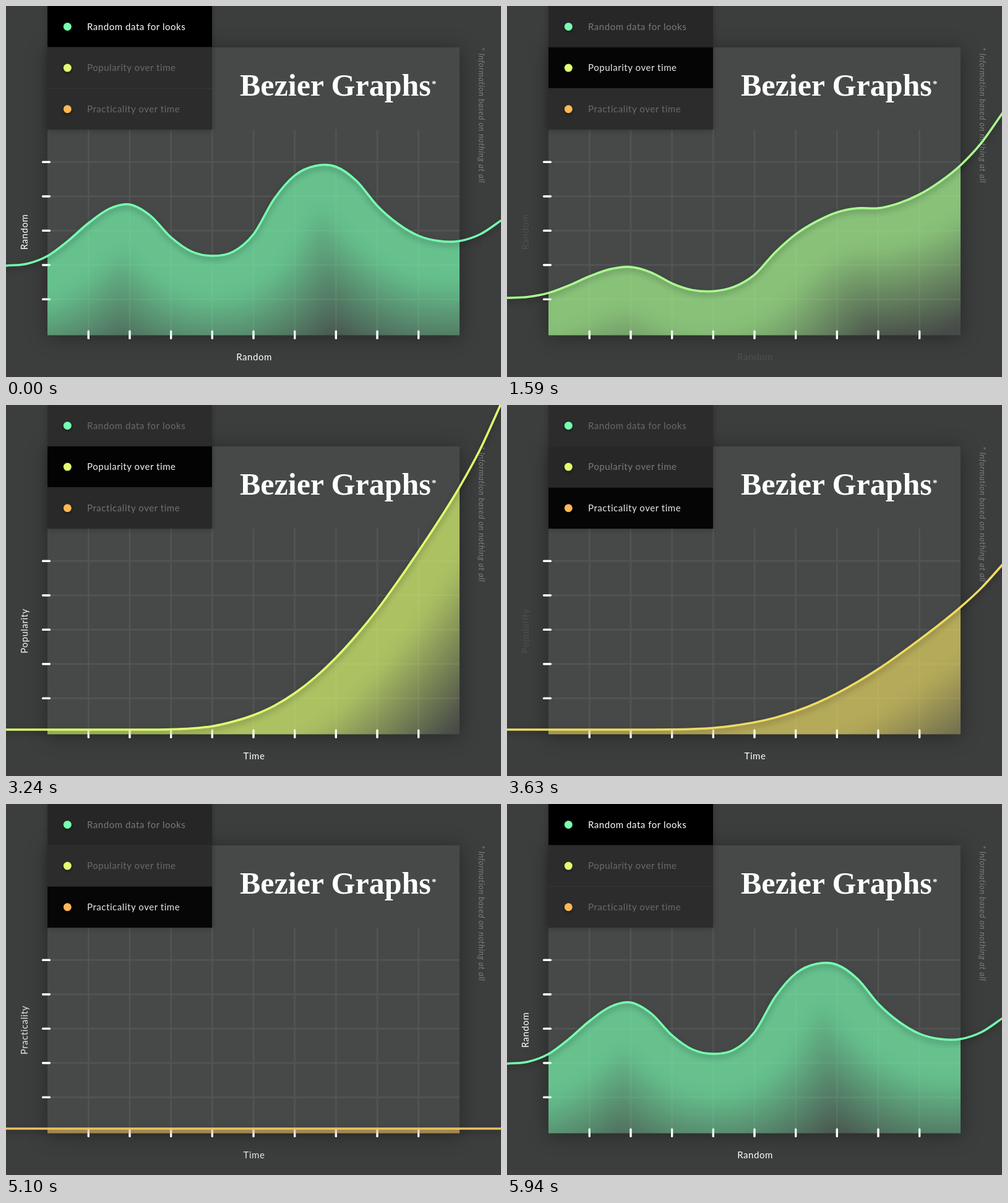
Animation, 800 px wide and 600 px high, one loop 5.97 s. Source, as an HTML page with a canvas:

```html
<!DOCTYPE html>
<html lang="en">
<head>
<meta charset="utf-8">
<title>Bezier Graphs</title>
<style>
  html, body { margin: 0; width: 100%; height: 100%; overflow: hidden; background: #3c3e3d; }
  svg, canvas { position: absolute; left: 0; top: 0; width: 800px; height: 600px; }
  text { font: 15px Lato, sans-serif; letter-spacing: .55px; fill: #fff; }
  .card { fill: #464948; filter: drop-shadow(0 3px 16px rgba(0, 0, 0, .35)); }
  .grid { stroke: #fff; stroke-opacity: .065; stroke-width: 2.5; }
  .menu { filter: drop-shadow(0 1px 5px rgba(0, 0, 0, .25)); }
  .dot { filter: drop-shadow(0 2px 2px rgba(0, 0, 0, .45)); }
  .title { font: bold 50px "Liberation Serif", serif; letter-spacing: 0; }
  .star { font: bold 15px "Liberation Serif", serif; }
  .note { font: italic 13px Lato, sans-serif; letter-spacing: .6px; fill: #7c7d7d; }
  .axis { text-anchor: middle; }
</style>
</head>
<body>
<svg viewBox="0 0 800 600">
  <rect class="card" x="67" y="67" width="666" height="465.5"/>
  <path class="grid" id="grid"/>
  <g class="menu" id="menu"></g>
  <text class="title" x="378" y="145">Bezier Graphs</text>
  <text class="star" x="688" y="130.5">*</text>
  <text class="note" transform="translate(764 67) rotate(90)">* Information based on nothing at all</text>
  <text class="axis" id="xLabel" x="401" y="573"></text>
  <text class="axis" id="yLabel" transform="translate(35 365.5) rotate(-90)"></text>
</svg>
<canvas id="plot" width="800" height="600"></canvas>
<script>
const LOOP = 5970, STARTS = [1170, 3210, 5040];
const MORPH = 844, MENU_FADE = 480, LABEL_OUT = 460, LABEL_IN = 440;
const STEP = 100 / 3, BOTTOM = 532.5, FLAT = 525;
const LEFT = 67, RIGHT = 733, GLOW = 0.66;

// Curve heights, sampled every STEP pixels across the stage
const views = [
  { name: 'Random data for looks', x: 'Random', y: 'Random', color: [118, 255, 177],
    pts: [420, 417, 404.5, 380, 351, 328, 321, 339, 374, 397, 404, 397.5, 369,
          312, 274, 258.5, 260, 283, 323, 352, 371.5, 380, 380, 369, 347] },
  { name: 'Popularity over time', x: 'Time', y: 'Popularity', color: [224, 255, 112],
    pts: [...Array(8).fill(FLAT), 524.5, 523, 519.5, 512, 501.5, 486.5, 466, 440, 408.5,
          372, 331, 285, 236.5, 186, 132, 71, -2] },
  { name: 'Practicality over time', x: 'Time', y: 'Practicality', color: [255, 184, 84],
    pts: Array(25).fill(FLAT) }
];

const $ = id => document.getElementById(id);
const clamp = v => Math.max(0, Math.min(1, v));
const mix = (a, b, k) => a + (b - a) * k;
const quartInOut = t => t < 0.5 ? 8 * t ** 4 : 1 - 8 * (1 - t) ** 4;

function svg(tag, attrs, parent) {
  const el = document.createElementNS('http://www.w3.org/2000/svg', tag);
  for (const key in attrs) el.setAttribute(key, attrs[key]);
  return parent.appendChild(el);
}

const cols = Array.from({ length: 9 }, (_, i) => 133.3 + i * 66.67);
const rows = Array.from({ length: 5 }, (_, i) => 252.3 + i * 55.5);
$('grid').setAttribute('d',
  cols.map(x => `M${x} 200V${BOTTOM}`).join('') + rows.map(y => `M${LEFT} ${y}H${RIGHT}`).join(''));

const items = views.map((view, i) => {
  const top = i * 66.67, mid = top + 33.4;
  const back = svg('rect', { x: LEFT, y: top, width: 266, height: 66.67 }, $('menu'));
  svg('circle', { class: 'dot', cx: 99.3, cy: mid, r: 6.5, fill: `rgb(${view.color})` }, $('menu'));
  const text = svg('text', { x: 131, y: mid + 5.2 }, $('menu'));
  text.textContent = view.name;
  return { back, text };
});
for (const y of [66.9, 133.5])
  svg('path', { d: `M${LEFT} ${y}h266`, stroke: '#fff', 'stroke-opacity': 0.03 }, $('menu'));

const ctx = $('plot').getContext('2d');
const glow = document.createElement('canvas');
glow.width = 800;
glow.height = 600;
const gtx = glow.getContext('2d');

const ticks = new Path2D();
for (const x of cols) { ticks.moveTo(x, 526); ticks.lineTo(x, 537.5); }
for (const y of rows) { ticks.moveTo(59.5, y); ticks.lineTo(70.5, y); }

function drawTicks(alpha) {
  ctx.strokeStyle = `rgba(255,255,255,${alpha})`;
  ctx.lineWidth = 3.2;
  ctx.lineCap = 'round';
  ctx.stroke(ticks);
}

// Smooth spline through the samples, with straight run-outs past both edges
function curvePath(pts) {
  const n = pts.length - 1;
  const at = i => i < 0 ? 2 * pts[0] - pts[1] : i > n ? 2 * pts[n] - pts[n - 1] : pts[i];
  const path = new Path2D();
  path.moveTo(-STEP, at(-1));
  path.lineTo(0, at(0));
  for (let i = 0; i < n; i++) {
    const x = i * STEP;
    path.bezierCurveTo(
      x + STEP / 3, at(i) + (at(i + 1) - at(i - 1)) / 6,
      x + STEP * 2 / 3, at(i + 1) - (at(i + 2) - at(i)) / 6,
      x + STEP, at(i + 1));
  }
  path.lineTo(800 + STEP, at(n + 1));
  return path;
}

// Light that fades with distance from the curve
function paintGlow(curve, color) {
  const layers = 28;
  gtx.globalCompositeOperation = 'source-over';
  gtx.clearRect(0, 0, 800, 600);
  gtx.globalCompositeOperation = 'lighter';
  gtx.strokeStyle = `rgba(255,255,255,${GLOW / layers})`;
  gtx.lineJoin = gtx.lineCap = 'round';
  for (let i = 0; i < layers; i++) {
    gtx.lineWidth = 2 * mix(65, 220, i / (layers - 1));
    gtx.stroke(curve);
  }
  gtx.globalCompositeOperation = 'source-in';
  gtx.fillStyle = color;
  gtx.fillRect(0, 0, 800, 600);
}

function drawPlot(pts, color) {
  const curve = curvePath(pts);
  paintGlow(curve, color);
  ctx.clearRect(0, 0, 800, 600);
  drawTicks(1);

  const area = new Path2D(curve);
  area.lineTo(800 + STEP, 700);
  area.lineTo(-STEP, 700);
  area.closePath();
  ctx.save();
  ctx.beginPath();
  ctx.rect(LEFT, 0, RIGHT - LEFT, BOTTOM);
  ctx.clip();
  ctx.clip(area);
  ctx.filter = 'blur(12px)';
  ctx.drawImage(glow, 0, 0);
  ctx.restore();
  drawTicks(0.65);

  ctx.save();
  ctx.shadowColor = 'rgba(0,0,0,.35)';
  ctx.shadowBlur = 10;
  ctx.shadowOffsetY = 4;
  ctx.strokeStyle = color;
  ctx.lineWidth = 3.5;
  ctx.lineJoin = 'round';
  ctx.stroke(curve);
  ctx.restore();
}

function setLabel(el, from, to, time) {
  const leaving = time < LABEL_OUT;
  el.textContent = leaving ? from : to;
  el.style.opacity = from === to ? 1
    : leaving ? 1 - time / LABEL_OUT : clamp((time - LABEL_OUT) / LABEL_IN);
}

function render(now) {
  const t = now % LOOP;
  const step = Math.max(0, STARTS.filter(s => t >= s).length - 1);
  const time = Math.max(0, t - STARTS[step]);
  const next = (step + 1) % 3;
  const a = views[step], b = views[next];

  const p = quartInOut(clamp(time / MORPH));
  const hue = step === 2 ? p ** 0.25 : p;
  const color = `rgb(${a.color.map((c, i) => Math.round(mix(c, b.color[i], hue)))})`;
  drawPlot(a.pts.map((y, i) => mix(y, b.pts[i], p)), color);

  const fade = clamp(time / MENU_FADE);
  items.forEach(({ back, text }, i) => {
    const on = i === step ? 1 - fade : i === next ? fade : 0;
    const shade = Math.round(44 * (1 - on));
    back.style.fill = `rgb(${shade},${shade},${shade})`;
    text.style.opacity = mix(0.29, 1, on);
  });
  setLabel($('xLabel'), a.x, b.x, time);
  setLabel($('yLabel'), a.y, b.y, time);
}

const start = performance.now();
function tick() {
  render(performance.now() - start);
  requestAnimationFrame(tick);
}
tick();
</script>
</body>
</html>
```
